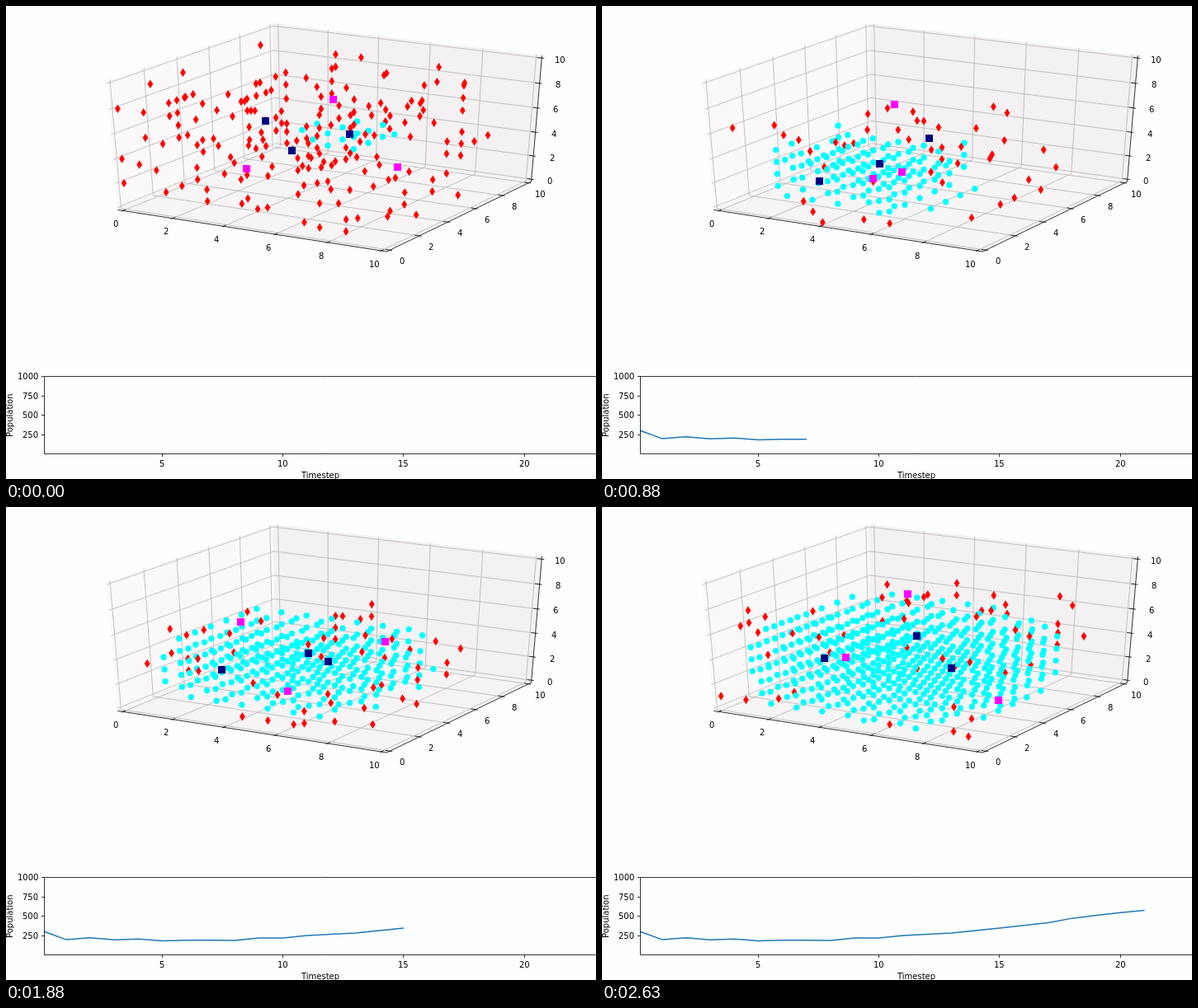
Write an HTML page with a canvas that moves like this. It is 715 px wide and 574 px high and loops after 2.76 s.

```html
<!DOCTYPE html>
<html lang="en">
<head>
<meta charset="utf-8">
<title>Population on a lattice</title>
<style>
  html, body { margin: 0; width: 100%; height: 100%; overflow: hidden; background: #fdffff; }
  canvas { display: block; }
</style>
</head>
<body>
<canvas id="stage" width="715" height="574"></canvas>
<script>
const ctx = document.getElementById('stage').getContext('2d');
const LOOP = 2760, LAST = 21;
const LO = -0.208, HI = 10.208;
const population = [312, 198, 222, 195, 205, 180, 190, 190, 187, 217, 217,
  250, 267, 283, 313, 345, 380, 415, 472, 510, 545, 575];

// Walkers pass their waypoints at these steps.
const LEGS = [0, 7, 15, LAST];
const walkers = [
  { color: '#f0f', way: [[291, 197], [328, 209], [341, 223], [480, 234]] },
  { color: '#f0f', way: [[396, 113], [354, 119], [284, 139], [295, 182]] },
  { color: '#f0f', way: [[474, 195], [363, 201], [459, 163], [370, 105]] },
  { color: '#000080', way: [[314, 139], [263, 212], [261, 197], [269, 183]] },
  { color: '#000080', way: [[346, 175], [336, 191], [366, 177], [381, 156]] },
  { color: '#000080', way: [[416, 155], [396, 160], [390, 187], [423, 195]] }
];

function random(n, seed) {
  const r = Math.sin(n * 12.9898 + seed * 78.233 + 4.7) * 43758.5453;
  return r - Math.floor(r);
}

// Perspective view from azimuth -60, elevation 30.
function project(x, y, z) {
  const a = x / 10 - 0.5, b = y / 10 - 0.5, c = z / 10 - 0.5;
  const near = 0.433 * a - 0.75 * b + 0.5 * c;
  const d = 10 - near;
  return {
    x: 390 + 3613 * (0.866 * a + 0.5 * b) / d,
    y: 154.6 - 1715 * (-0.25 * a + 0.433 * b + 0.866 * c) / d,
    near
  };
}

function path(points) {
  ctx.beginPath();
  for (const p of points) ctx.lineTo(p.x, p.y);
}

function line(color, width, ...points) {
  path(points);
  ctx.strokeStyle = color;
  ctx.lineWidth = width;
  ctx.stroke();
}

function fill(color, ...points) {
  path(points);
  ctx.fillStyle = color;
  ctx.fill();
}

// Text sits on whole pixels; anchor is the share of its width left of x.
function label(text, x, y, anchor = 0.5) {
  ctx.font = '10px "DejaVu Sans", sans-serif';
  ctx.fillStyle = '#000';
  const width = ctx.measureText(text).width;
  ctx.fillText(text, Math.round(x - width * anchor), Math.round(y + 3.7));
}

function drawBox() {
  const p = project, grid = '#b4b4b4';
  const left = p(LO, LO, LO), front = p(HI, LO, LO), right = p(HI, HI, LO), back = p(LO, HI, LO);
  const leftTop = p(LO, LO, HI), rightTop = p(HI, HI, HI), backTop = p(LO, HI, HI);
  fill('#faf8f9', left, back, backTop, leftTop);
  fill('#f3f1f2', back, right, rightTop, backTop);
  fill('#f6f4f5', left, front, right, back);

  for (let t = 0; t <= 10; t += 2) {
    line(grid, 0.8, p(t, LO, LO), p(t, HI, LO), p(t, HI, HI));
    line(grid, 0.8, p(HI, t, LO), p(LO, t, LO), p(LO, t, HI));
    line(grid, 0.8, p(LO, LO, t), p(LO, HI, t), p(HI, HI, t));
  }
  line('#000', 0.8, left, front, right, rightTop);

  const inner = 0.17, outer = 0.09;
  for (let t = 0; t <= 10; t += 2) {
    const x = p(t, LO, LO), y = p(HI, t, LO), z = p(HI, HI, t);
    line('#000', 0.8, p(t, LO - outer, LO), p(t, LO + inner, LO));
    line('#000', 0.8, p(HI - inner, t, LO), p(HI + outer, t, LO));
    line('#000', 0.8, p(HI - inner, HI, t), p(HI + outer, HI, t));
    label(t, x.x - 8, x.y + 16);
    label(t, y.x + 14.5, y.y + 13.5);
    label(t, z.x + 22.5, z.y + 2);
  }
}

const lattice = Array.from({ length: 1000 }, (_, n) => {
  const x = Math.floor(n / 100), y = Math.floor(n / 10) % 10, z = n % 10;
  const clump = Math.floor(x / 2) * 25 + Math.floor(y / 2) * 5 + Math.floor(z / 2);
  return { n, x, y, z, clump, at: project(x, y, z) };
});

// The colony is the cells nearest its drifting centre, loosened into clumps early on;
// newborns are a random share of the shell around it.
function cellsAt(step) {
  const g = step / LAST, early = Math.exp(-step);
  const cx = 3.3 + 1.3 * g + 2.1 * early;
  const cy = 3.5 + 0.9 * g + 2.1 * early;
  const cz = 2.1 + g + 2.7 * early;
  const loose = 0.9 * step * Math.exp(-step / 2.2);
  const settled = Math.round((population[step] - 60) * Math.min(1, 0.065 + step / 7));
  const shell = 290 + 690 * Math.exp(-step / 5);
  const births = (48 + 117 * early) / shell;
  const score = c =>
    ((c.x - cx) ** 4 + (c.y - cy) ** 4 + ((c.z - cz) / 0.7) ** 4) ** 0.25 / 4.4
    + loose * random(c.clump, 5) + 0.07 * random(c.n, 1);

  return lattice
    .map(c => ({ ...c, score: score(c) }))
    .sort((a, b) => a.score - b.score)
    .map((c, rank) => ({ ...c, rank, newborn: rank >= settled }))
    .filter(c => !c.newborn || (c.rank < settled + shell && random(c.n, step + 2) < births))
    .sort((a, b) => a.at.near - b.at.near);
}

function drawCell({ at: { x, y }, newborn }) {
  if (newborn) {
    fill('#f00', { x, y: y - 5.2 }, { x: x + 3.4, y }, { x, y: y + 5.2 }, { x: x - 3.4, y });
  } else {
    ctx.fillStyle = '#0ff';
    ctx.beginPath();
    ctx.arc(x, y, 3.7, 0, 2 * Math.PI);
    ctx.fill();
  }
}

function drawWalkers(step) {
  const leg = Math.max(0, LEGS.findIndex(s => s >= step) - 1);
  const part = (step - LEGS[leg]) / (LEGS[leg + 1] - LEGS[leg]);
  for (const { color, way } of walkers) {
    const [x, y] = way[leg].map((v, i) => Math.round(v + (way[leg + 1][i] - v) * part));
    ctx.fillStyle = color;
    ctx.fillRect(x - 4, y - 4, 9, 9);
  }
}

function drawChart(step) {
  const px = i => 43.4 + 29.24 * i, py = v => 543.5 - 0.094 * v;
  ctx.save();
  ctx.beginPath();
  ctx.rect(46, 449, 669, 95);
  ctx.clip();
  ctx.lineJoin = 'round';
  line('#1f77b4', 1.5, ...population.slice(0, step + 1).map((v, i) => ({ x: px(i), y: py(v) })));
  ctx.restore();
  line('#000', 0.8, { x: 720, y: 449.5 }, { x: 46.5, y: 449.5 }, { x: 46.5, y: 543.5 }, { x: 720, y: 543.5 });
  for (let v = 250; v <= 1000; v += 250) {
    const y = Math.floor(py(v)) + 0.5;
    line('#000', 0.8, { x: 43, y }, { x: 46.5, y });
    label(v, 39, y, 1);
  }
  for (let i = 5; i <= 20; i += 5) {
    const x = Math.floor(px(i)) + 0.5;
    line('#000', 0.8, { x, y: 543.5 }, { x, y: 547 });
    label(i, x, 555);
  }
  label('Timestep', 381.5, 569.3);
  ctx.save();
  ctx.translate(4, 497);
  ctx.rotate(-Math.PI / 2);
  label('Population', 0, 0);
  ctx.restore();
}

function draw(step) {
  ctx.fillStyle = '#fdffff';
  ctx.fillRect(0, 0, 715, 574);
  drawBox();
  cellsAt(step).forEach(drawCell);
  drawWalkers(step);
  drawChart(step);
}

let shown = -1;
function tick() {
  const t = performance.now() % LOOP;
  let step = LAST;
  while (t < Math.round(step * 12.5) * 10) step--;
  if (step !== shown) draw(shown = step);
  requestAnimationFrame(tick);
}
tick();
</script>
</body>
</html>
```
